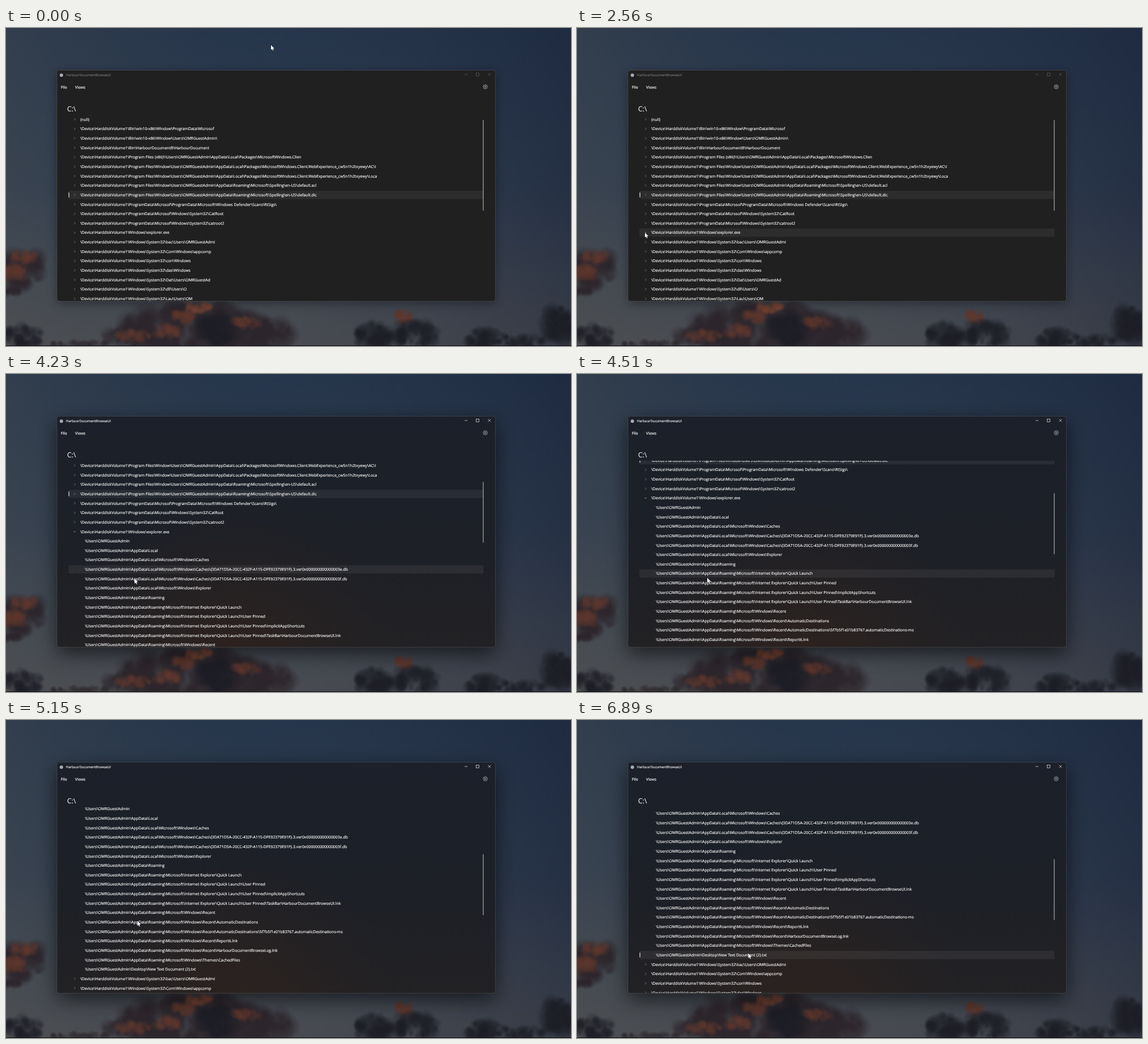
Animation, 998 px wide and 561 px high, one loop 8680 ms. Source, as an HTML page with a canvas:

```html
<!DOCTYPE html>
<html lang="en">
<head>
<meta charset="utf-8">
<title>Package tree</title>
<style>
html, body { margin: 0; width: 100%; height: 100%; overflow: hidden; background: #2a3648; }
canvas { display: block; width: 998px; height: 561px; }
</style>
</head>
<body>
<canvas id="stage" width="998" height="561"></canvas>
<script>
const W = 998, H = 561, LOOP = 8680;
const ctx = document.getElementById('stage').getContext('2d');
const APP = 'HarbourDocumentBrowse', USER = 'OMRGuestAdmin';
const FONT = '"Open Sans", "Noto Sans", sans-serif';
const PITCH = 16.64, TOP = 161.3, OPENED = 12;
const win = { x: 90, y: 74.5, w: 774.5, h: 407.5 };

const vol = '\\Device\\HarddiskVolume1\\';
const web = `Program Files\\Window\\Users\\${USER}\\AppData\\Local\\Packages\\MicrosoftWindows.Client.WebExperience_cw5n1h2txyewy\\`;
const spell = `Program Files\\Window\\Users\\${USER}\\AppData\\Roaming\\Microsoft\\Spelling\\en-US\\default.`;
const sys = 'Windows\\System32\\';
const parents = ['(null)', ...[
  'Bin\\win10-x86\\Window\\ProgramData\\Microsof',
  `Bin\\win10-x86\\Window\\Users\\${USER}\\`,
  `Bin\\${APP.slice(0, 16)}\\${APP.slice(0, 15)}`,
  `Program Files (x86)\\\\Users\\${USER}\\AppData\\Local\\Packages\\MicrosoftWindows.Clien`,
  web + 'AC\\I',
  web + 'Loca',
  spell + 'acl',
  spell + 'dic',
  'ProgramData\\Microsof\\ProgramData\\Microsoft\\Windows Defender\\Scans\\RtSigs\\',
  'ProgramData\\Microsof\\Windows\\System32\\CatRoot',
  'ProgramData\\Microsof\\Windows\\System32\\catroot2',
  'Windows\\explorer.exe',
  sys + 'bac\\Users\\' + USER.slice(0, 12),
  sys + 'Com\\Windows\\appcomp',
  sys + 'con\\Windows',
  sys + 'das\\Windows',
  sys + 'Dat\\Users\\' + USER.slice(0, 10),
  sys + 'dll\\Users\\' + USER[0],
  sys + 'Lau\\Users\\' + USER.slice(0, 2)
].map(s => vol + s)];

const home = '\\Users\\' + USER;
const local = home + '\\AppData\\Local', roam = home + '\\AppData\\Roaming';
const caches = local + '\\Microsoft\\Windows\\Caches';
const cacheDb = caches + '\\{3DA71D5A-20CC-432F-A115-DFE92379E91F}.3.ver0x000000000000003';
const quick = roam + '\\Microsoft\\Internet Explorer\\Quick Launch';
const recent = roam + '\\Microsoft\\Windows\\Recent';
const children = [
  home, local, caches, cacheDb + 'e.db', cacheDb + 'f.db',
  local + '\\Microsoft\\Windows\\Explorer',
  roam, quick, quick + '\\User Pinned',
  quick + '\\User Pinned\\ImplicitAppShortcuts',
  quick + `\\User Pinned\\TaskBar\\${APP}UI.lnk`,
  recent, recent + '\\AutomaticDestinations',
  recent + '\\AutomaticDestinations\\5f7b5f1e01b83767.automaticDestinations-ms',
  recent + '\\Report6.lnk', recent + `\\${APP}Log.lnk`,
  roam + '\\Microsoft\\Windows\\Themes\\CachedFiles',
  home + '\\Desktop\\New Text Document (2).txt'
];

const cursorX = [[550, 468], [720, 502], [860, 510], [1100, 440], [1370, 268], [1500, 320],
  [1700, 270], [2030, 118], [2290, 118], [2560, 120], [3250, 120], [3690, 222], [3960, 223],
  [4230, 227], [4510, 230], [5150, 232], [5400, 234], [5790, 302.5]];
const cursorY = [[550, 30], [720, 70], [860, 130], [1100, 270], [1370, 364], [1500, 367],
  [2030, 363], [2290, 362], [2560, 361], [3250, 361], [3690, 364], [3960, 364],
  [4230, 361], [4510, 359.5], [5150, 354.5], [5400, 356], [5790, 411.5]];
const scrollKeys = [[3760, 0], [3890, 2], [3960, 9.6], [4230, 82.7], [4510, 142], [4600, 150],
  [4850, 180], [5000, 181], [5150, 220.6], [5290, 238], [5480, 246]];

const clamp = v => Math.max(0, Math.min(1, v));
const ramp = (t, a, b) => clamp((t - a) / (b - a));

// Monotone cubic through the keys, held at both ends.
function track(keys, t) {
  const n = keys.length - 1;
  if (t <= keys[0][0]) return keys[0][1];
  if (t >= keys[n][0]) return keys[n][1];
  const slope = i => (keys[i + 1][1] - keys[i][1]) / (keys[i + 1][0] - keys[i][0]);
  const tangent = i => {
    if (i === 0 || i === n) return 0;
    const a = slope(i - 1), b = slope(i);
    return a * b <= 0 ? 0 : 2 * a * b / (a + b);
  };
  const i = keys.findIndex(k => k[0] > t) - 1;
  const [t0, v0] = keys[i], [t1, v1] = keys[i + 1];
  const d = t1 - t0, u = (t - t0) / d, w = 1 - u;
  return v0 * (1 + 2 * u) * w * w + v1 * u * u * (3 - 2 * u)
    + d * u * w * (tangent(i) * w - tangent(i + 1) * u);
}

function makeSky() {
  const c = document.createElement('canvas');
  c.width = W; c.height = H;
  const g = c.getContext('2d');
  const wash = (x1, y1, stops) => {
    const grad = g.createLinearGradient(0, 0, x1, y1);
    stops.forEach(([p, color]) => grad.addColorStop(p, color));
    g.fillStyle = grad;
    g.fillRect(0, 0, W, H);
  };
  wash(0, H, [[0, '#25354b'], [0.5, '#303d50'], [0.8, '#434952'], [1, '#4d4e52']]);
  wash(W, 0, [[0, 'rgba(76,80,80,.34)'], [0.45, 'rgba(45,58,76,.08)'], [1, 'rgba(18,26,48,.38)']]);

  let seed = 7;
  const rnd = () => (seed = seed * 16807 % 2147483647) / 2147483647;
  const puff = (x, y, r, rgb) => {
    const grad = g.createRadialGradient(x, y, 0, x, y, r);
    grad.addColorStop(0, `rgba(${rgb},.4)`);
    grad.addColorStop(0.5, `rgba(${rgb},.28)`);
    grad.addColorStop(1, `rgba(${rgb},0)`);
    g.fillStyle = grad;
    g.fillRect(x - r, y - r, 2 * r, 2 * r);
  };
  const dark = '27,28,36', plum = '43,36,42', rust = '94,54,44', glow = '122,68,50';
  const clouds = [
    [30, 425, 34, 30, plum], [32, 403, 22, 9, rust], [14, 432, 20, 12, rust],
    [10, 465, 14, 8, plum],
    [330, 530, 130, 38, plum], [230, 545, 55, 18, plum], [440, 540, 65, 26, plum],
    [340, 493, 24, 7, glow], [310, 510, 22, 9, rust], [285, 535, 24, 9, rust],
    [425, 520, 24, 8, rust], [225, 543, 28, 8, rust], [370, 535, 30, 26, dark],
    [650, 543, 36, 22, dark], [702, 511, 16, 9, rust],
    [722, 540, 40, 20, dark], [30, 546, 34, 18, dark], [130, 557, 50, 5, plum],
    [845, 547, 30, 18, dark], [905, 552, 45, 10, dark], [978, 525, 26, 32, dark]
  ];
  for (const [x, y, rx, ry, rgb] of clouds) {
    const count = 20 + rx * ry / 25;
    for (let i = 0; i < count; i++) {
      const a = rnd() * 2 * Math.PI, d = Math.sqrt(rnd());
      puff(x + Math.cos(a) * d * rx, y + Math.sin(a) * d * ry, 5 + rnd() * Math.min(rx, ry) * 0.6, rgb);
    }
  }
  g.fillStyle = '#0b0c10';
  g.fillRect(0, 560, W, 1);
  return c;
}
const sky = makeSky();

// A hairline outline gives small type the weight of screen text.
function text(s, x, y, size, color) {
  ctx.font = `${size}px ${FONT}`;
  ctx.fillStyle = ctx.strokeStyle = color;
  ctx.lineWidth = 0.16;
  ctx.fillText(s, x, y);
  ctx.strokeText(s, x, y);
}

function line(points, color, width) {
  ctx.beginPath();
  points.forEach(([x, y]) => ctx.lineTo(x, y));
  ctx.strokeStyle = color;
  ctx.lineWidth = width;
  ctx.stroke();
}

function box(x, y, w, h, r, color) {
  ctx.beginPath();
  ctx.roundRect(x, y, w, h, r);
  ctx.fillStyle = color;
  ctx.fill();
}

function drawWindow(active) {
  const { x, y, w, h } = win;
  ctx.save();
  ctx.shadowColor = `rgba(0,0,0,${0.38 + 0.22 * active})`;
  ctx.shadowBlur = 18 + 16 * active;
  ctx.shadowOffsetY = 4 + 7 * active;
  box(x, y, w, h, 4, '#202020');
  ctx.restore();

  ctx.globalAlpha = active;
  const cool = ctx.createLinearGradient(0, y, 0, y + h);
  cool.addColorStop(0, '#1b202a');
  cool.addColorStop(0.55, '#1d2027');
  cool.addColorStop(1, '#222124');
  box(x, y, w, h, 4, cool);
  const warm = ctx.createRadialGradient(400, 500, 0, 400, 500, 280);
  warm.addColorStop(0, 'rgba(56,36,25,.45)');
  warm.addColorStop(1, 'rgba(56,36,25,0)');
  box(x, y, w, h, 4, warm);
  ctx.globalAlpha = 1;

  ctx.beginPath();
  ctx.roundRect(x, y, w, h, 4);
  ctx.strokeStyle = 'rgba(125,125,130,.38)';
  ctx.lineWidth = 0.8;
  ctx.stroke();

  const shade = (a, b) => { const v = Math.round(a + (b - a) * active); return `rgb(${v},${v},${v})`; };
  ctx.beginPath();
  ctx.arc(97.8, 83.2, 3, 0, 7);
  ctx.fillStyle = '#a3acb5';
  ctx.fill();
  text(APP + 'UI', 106, 85.4, 5.97, shade(115, 238));

  const cap = shade(98, 235);
  line([[810, 82], [815, 82]], cap, 0.7);
  ctx.strokeRect(830.6, 79.6, 4.8, 4.8);
  line([[851.5, 79.5], [856.3, 84.3]], cap, 0.7);
  line([[856.3, 79.5], [851.5, 84.3]], cap, 0.7);

  text('File', 97, 106.6, 6.95, '#ffffff');
  text('Views', 122, 106.6, 6.95, '#ffffff');
  text('C:\\', 108, 146.7, 12.3, '#ececec');
  drawGear(846.6, 103.7);
}

function drawGear(x, y) {
  ctx.beginPath();
  for (let i = 0; i <= 64; i++) {
    const a = i / 64 * 2 * Math.PI, r = 3.5 + 0.4 * Math.cos(8 * a);
    ctx.lineTo(x + r * Math.cos(a), y + r * Math.sin(a));
  }
  ctx.moveTo(x + 1.3, y);
  ctx.arc(x, y, 1.3, 0, 2 * Math.PI);
  ctx.strokeStyle = '#dedede';
  ctx.lineWidth = 0.75;
  ctx.stroke();
}

function drawRow(label, y, child, open) {
  text(label, child ? 139.4 : 131.2, y + 2.5, 6.91, '#fafafa');
  if (child) return;
  const tip = open ? [[119.4, y - 0.8], [121.1, y + 0.9], [122.8, y - 0.8]]
    : [[120.5, y - 1.8], [122.2, y], [120.5, y + 1.8]];
  line(tip, open ? '#aaaaaa' : '#858585', 0.8);
}

function drawList(t, cy) {
  const scroll = track(scrollKeys, t);
  const open = 1 - (1 - ramp(t, 2930, 3260)) ** 3;
  const rowY = i => TOP + i * PITCH - scroll;
  const band = i => box(110.3, rowY(i) - 7.2, 733.2, 14.5, 2, 'rgba(255,255,255,.06)');

  ctx.save();
  ctx.beginPath();
  ctx.rect(win.x, 153, win.w, win.y + win.h - 153.6);
  ctx.clip();

  const picked = t < 6770 ? 8 : OPENED + children.length;
  band(picked);
  // The pointer highlight trails the scrolling and drops out while it pauses.
  if (cy > 153 && (t < 4560 || t > 5700)) {
    const hover = Math.round((cy + track(scrollKeys, t - 70) - TOP) / PITCH);
    if (hover !== picked) band(hover);
  }
  const grow = t < 6770 ? 1 : 0.4 + 0.6 * ramp(t, 6770, 6890);
  box(110.4, rowY(picked) - 4.3 * grow, 1.6, 8.6 * grow, 0.8, '#b4b4b4');

  parents.forEach((s, i) => {
    const shift = i > OPENED ? open * children.length : 0;
    drawRow(s, rowY(i + shift), false, i === OPENED && open > 0);
  });
  if (open > 0) {
    ctx.globalAlpha = ramp(t, 2990, 3260);
    children.forEach((s, i) => drawRow(s, rowY(OPENED + 1 + i), true));
    ctx.globalAlpha = 1;
  }
  ctx.restore();

  box(842.3, 162.2 + 0.338 * scroll, 1.3, 160 - 52.5 * open, 0.6, '#a2a2a2');
}

function drawCursor(x, y) {
  const shape = [[0, 0], [0, 8.8], [2, 7], [3.4, 10.1], [4.7, 9.5], [3.4, 6.5], [6.1, 6.3]];
  ctx.beginPath();
  shape.forEach(([dx, dy]) => ctx.lineTo(x + dx, y + dy));
  ctx.closePath();
  ctx.strokeStyle = 'rgba(0,0,0,.6)';
  ctx.lineWidth = 0.8;
  ctx.stroke();
  ctx.fillStyle = '#f4f4f4';
  ctx.fill();
}

function draw(t) {
  const cx = track(cursorX, t), cy = track(cursorY, t);
  ctx.drawImage(sky, 0, 0);
  drawWindow(ramp(t, 2850, 3050));
  drawList(t, cy);
  drawCursor(cx, cy);
}

ctx.textRendering = 'geometricPrecision';
const start = performance.now();
function tick() {
  draw((performance.now() - start) % LOOP);
  requestAnimationFrame(tick);
}
tick();
</script>
</body>
</html>
```
